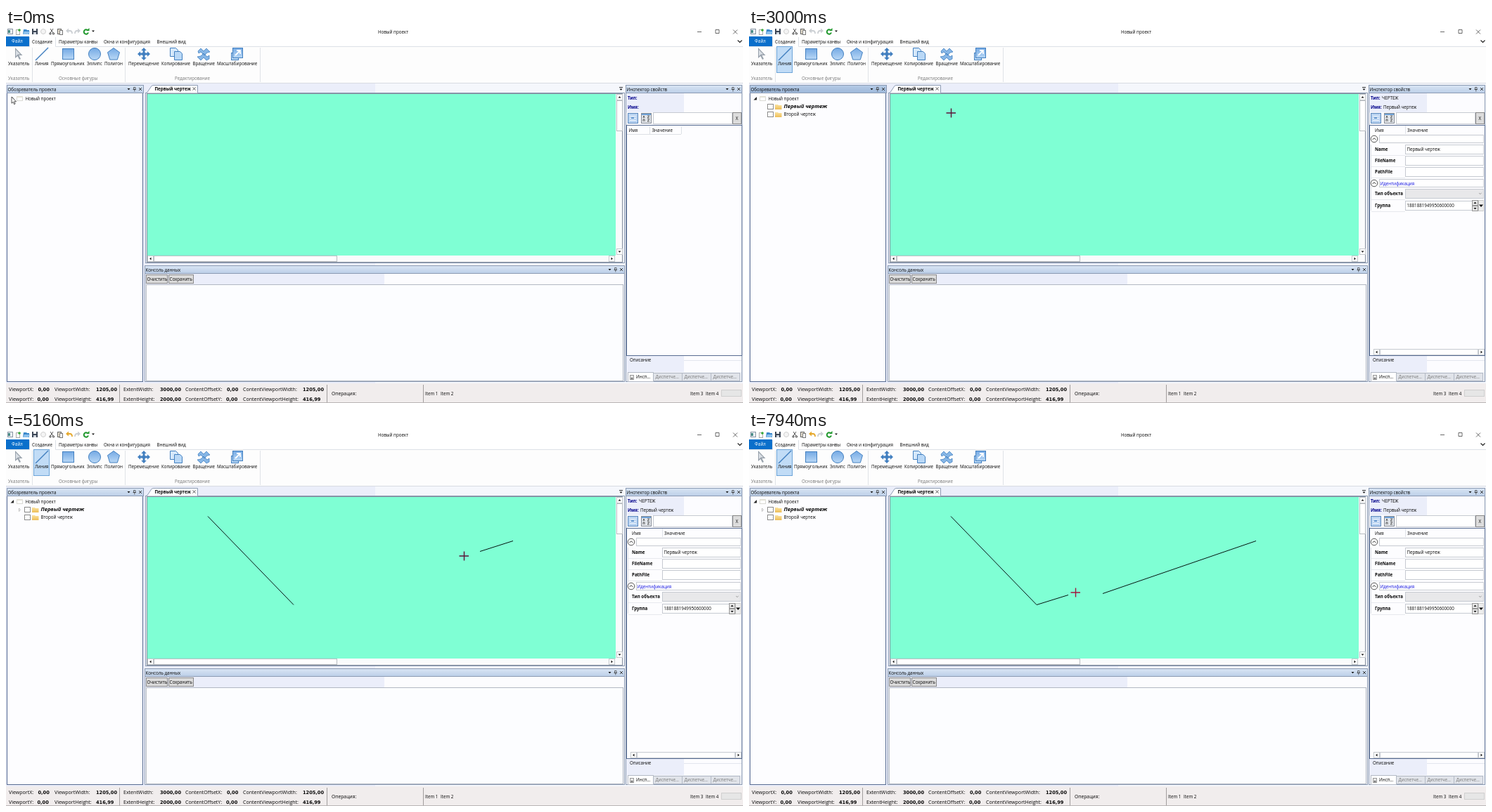
Animation, 1048 px wide and 534 px high, one loop 8000 ms. Source, as an HTML page:

```html
<!DOCTYPE html>
<html lang="ru">
<head>
<meta charset="utf-8">
<title>Новый проект</title>
<style>
html, body { margin: 0; width: 100%; height: 100%; overflow: hidden; background: #fff }
svg { display: block; width: 100%; height: 100% }
text { font: 6.2px "Open Sans", "Noto Sans", sans-serif; fill: #080808; white-space: pre }
.b { font-weight: 700 }
.bi { font-weight: 700; font-style: italic; font-size: 7.5px }
.navy { fill: #00008b; font-weight: 700 }
.blue { fill: #1414e0 }
.gray { fill: #777 }
.white { fill: #fff }
.st { font-size: 7.05px }
.num { font: 700 6.6px "DejaVu Sans", sans-serif }
.op { font-size: 6.75px }
</style>
</head>
<body>
<svg id="stage" viewBox="0 0 1048 534">
  <defs>
    <linearGradient id="head" x2="0" y2="1"><stop stop-color="#d9e5f4"/><stop offset="1" stop-color="#bccfe8"/></linearGradient>
    <linearGradient id="active" x2="0" y2="1"><stop stop-color="#b6cbe6"/><stop offset="1" stop-color="#9db8da"/></linearGradient>
    <linearGradient id="shape" x2="0" y2="1"><stop stop-color="#74a9e4"/><stop offset="1" stop-color="#b9d8f6"/></linearGradient>
    <linearGradient id="folder" x2="0" y2="1"><stop stop-color="#fbe3a0"/><stop offset="1" stop-color="#edbd57"/></linearGradient>
  </defs>
</svg>
<script>
const stage = document.getElementById('stage');
const BORDER = '#8c9bb3', DEEP = '#586c92', TINT = '#ebeefa', AQUA = '#7fffd4', ICON = '#4380c0', SHAPE = 'url(#shape)';

// Markup helpers; text is placed by its left edge and middle line.
const text = (x, y, s, cls = '') => `<text x="${x}" y="${y + 2.2}" class="${cls}">${s}</text>`;
const fill = (x, y, w, h, color) => `<rect x="${x}" y="${y}" width="${w}" height="${h}" fill="${color}"/>`;
const box = (x, y, w, h, color = '#fdfdff', line = BORDER) =>
  `<rect x="${x + .5}" y="${y + .5}" width="${w - 1}" height="${h - 1}" fill="${color}" stroke="${line}"/>`;
const path = (d, line = '#333', width = 1, color = 'none') =>
  `<path d="${d}" stroke="${line}" stroke-width="${width}" fill="${color}"/>`;
const solid = (d, color) => path(d, 'none', 0, color);
const circle = (x, y, r, color, line) => `<circle cx="${x}" cy="${y}" r="${r}" fill="${color}" stroke="${line}"/>`;
const tri = (x, y, turn = 0, s = 2, color = '#111') =>
  `<path d="M${-s} ${-s / 2}H${s}L0 ${s * .65}z" fill="${color}" transform="translate(${x} ${y}) rotate(${turn})"/>`;
const cross = (x, y, s = 2) => path(`M${x - s} ${y - s}l${2 * s} ${2 * s}m0 ${-2 * s}l${-2 * s} ${2 * s}`, '#333', .9);
const group = (id, body) => `<g id="${id}">${body}</g>`;

function header(x, y, w, title) {
  const r = x + w;
  return box(x, y, w, 12, 'url(#head)') + text(x + 1.5, y + 6.3, title) + tri(r - 21.5, y + 6) +
    path(`M${r - 14.5} ${y + 3.5}h2.500v3h-2.500zm-1 3h4.500m-2.200 0v3`, '#333', .7) + cross(r - 5, y + 6);
}
const scrollButton = (x, y, turn) => box(x, y, 9, 9, '#fff', '#c4c8cc') + tri(x + 4.5, y + 4.5, turn);

function titleBar() {
  return fill(0, 0, 1048, 26, '#fff') + text(529, 5.5, 'Новый проект') +
    box(2, 1, 8, 8, '#eef3f8', '#8895a3') + fill(3, 3, 3, 4, '#4b8d87') +
    box(14, 2, 6, 8, '#fff', '#aaa') + circle(19, 3, 1.8, '#36a936', 'none') +
    solid('M25 2h4l1 1h3v6h-9z', '#3c89cc') + solid('M26 5h8l-2 4h-8z', '#8dc1ec') +
    fill(37, 1, 8, 8, '#3d4756') + fill(39, 1, 4, 3, '#fff') + fill(39, 6, 4, 3, '#cdd3db') +
    circle(53, 5, 3.5, '#f4f4f4', '#d0d0d0') +
    path('M63 1l4 6m0-6l-4 6', '#555') + circle(63, 8, 1.2, 'none', '#444') + circle(67.5, 8, 1.2, 'none', '#444') +
    box(73, 1, 6, 8, '#e6dfd0', '#666') + box(76, 3, 5, 7, '#fff', '#777') +
    `<g id="undo">${path('M88 4h3q3 0 3 4', 'currentColor', 1.8)}${solid('M85 4l4-3.5v7z', 'currentColor')}</g>` +
    path('M103 4h-2q-3 0-3 4', '#ccd0d4', 1.8) + solid('M106 4l-4-3.5v7z', '#ccd0d4') +
    path('M116.5 3.5a3.2 3.2 0 1 0 .5 3', '#22992e', 2) + solid('M114 4h4.5V0z', '#22992e') + tri(124, 4.5) +
    path('M983 5.5h6m20-3h5v5h-5zM1034 2.5l6 6m0-6l-6 6', '#444', .8) +
    fill(0, 12, 33, 14, '#0a6fcb') + text(8, 19, 'Файл', 'white') +
    path('M0 26.5H33.5V13M70.5 13V26.5H1048', '#dde1e6') + text(37, 19.3, 'Создание') +
    text(75, 19.3, 'Параметры канвы') + text(139, 19.3, 'Окна и конфигурация') +
    text(214.5, 19.3, 'Внешний вид') + path('M1040.5 17.5l3 3 3-3', '#222', 1.2);
}

function ribbon() {
  const moveArrow = [0, 90, 180, 270].map(a =>
    `<path d="M-1.5 -2v-3h-2.3L0 -9l3.8 4h-2.3v3z" fill="${ICON}" transform="translate(196 37) rotate(${a})"/>`).join('');
  const labels = [[3, 'Указатель'], [41, 'Линия'], [64, 'Прямоугольник'], [115, 'Эллипс'], [140, 'Полигон'],
    [174, 'Перемещение'], [221, 'Копирование'], [265.5, 'Вращение'], [300, 'Масштабирование']];
  return fill(0, 27, 1048, 51, '#fdfdfd') + group('button', box(39, 26, 23, 38, 'currentColor', '#6ea5d8')) +
    path('M37.5 28V77M169.5 28V77M361.5 28V77', '#e0e3e7') + path('M0 78.5H1048', '#d8dce3') +
    solid('M13 28v15l3.5-3 2.5 5 2-1-2.5-5h5z', '#9aa3ad') + solid('M14 31v9l3-2.5 3.5 0z', '#d9dee4') +
    path('M42 46L60 28', ICON, 1.4) + box(80, 29, 17, 16, SHAPE, ICON) + circle(126, 37, 8.5, SHAPE, ICON) +
    path('M153 28.5l8.5 6.2-3.2 10.3h-10.6l-3.2-10.3z', ICON, 1, SHAPE) +
    moveArrow + fill(194, 35, 4, 4, ICON) +
    path('M233.5 28.5h8l3 3v9h-11z', ICON, 1, '#d5e8fb') + path('M239.5 33.5h8l3 3v9h-11z', ICON, 1, '#b9d8f6') +
    path('M273 33l4-4 4 4 4-4 5 5-4 1-4 4-5-5-3 2zM272 41l5-1 4-4 5 5 3-2v5l-4 2-4-4-4 4z', ICON, .8, '#86b6e6') +
    box(320, 35, 11, 11, '#b9d8f6', ICON) + box(322, 28, 15, 15, SHAPE, ICON) +
    path('M326 39l6-6m-4-1h5v5', '#fff', 1.8) +
    labels.map(([x, s]) => text(x, 51, s)).join('') +
    text(3, 72, 'Указатель', 'gray') + text(75, 72, 'Основные фигуры', 'gray') + text(240, 72, 'Редактирование', 'gray');
}

function treePanel() {
  const child = (y, label) => box(26, y - 4, 9, 8, '#fff', '#8a8a8a') +
    solid(`M37 ${y - 3}h4l1 1h4.500v6h-9.500z`, 'url(#folder)') + label;
  return box(1, 92, 194, 412, '#fdfdff', DEEP) + group('treeHead', header(1, 81, 195, 'Обозреватель проекта')) +
    box(15, 97, 9, 7, '#fff', '#d9d9d4') + fill(15, 97, 9, 2, '#e3e1d6') + text(27.5, 100.5, 'Новый проект') +
    group('closed', path('M8.5 98v5l2.5-2.5z', '#999', .7, '#fff')) +
    group('open', solid('M11 98v4.5H6.5z', '#222') +
      group('mark', box(49, 107, 54, 10.5, '#cfeafd', '#a5d6f6')) +
      child(112, group('plain', text(49.5, 112, 'Первый чертеж')) + group('bold', text(49.5, 112, 'Первый чертеж', 'b')) +
        group('italic', text(49.5, 112, 'Первый чертеж', 'bi'))) +
      child(123, text(49.5, 122.8, 'Второй чертеж')) +
      group('expander', path('M18.5 110v4.5l2.2-2.2z', '#aaa', .7, '#fff')));
}

function drawingPanel() {
  return box(198, 92, 682, 243, '#f5f7fb') + path('M199 92.5l2-1 6-9q1-1 3-1h62.5v11', BORDER, 1, '#fff') +
    text(211.5, 86.6, 'Первый чертеж', 'b') + cross(267.5, 86.5) +
    path('M872 84.5h5', '#333') + tri(874.5, 87.5) + box(200, 93, 677, 241, '#fafbfc', '#858f9e') +
    fill(201, 94, 666, 230, AQUA) +
    scrollButton(868, 94, 180) + box(868, 103, 9, 44, '#fff', '#b8bcc1') + scrollButton(868, 314, 0) +
    scrollButton(201, 324, 90) + box(210, 324, 261, 9, '#fff', '#b8bcc1') + scrollButton(857, 324, -90);
}

function consolePanel() {
  const button = (x, w, s) => box(x, 351, w, 13, '#dcdcdc', '#8a8a8a') + text(x + 1.5, 357.8, s);
  return box(197, 338, 683, 166, '#fcfcfe') + header(197, 338, 683, 'Консоль данных') +
    fill(198, 350, 340, 15, TINT) + button(199, 31, 'Очистить') + button(231, 36, 'Сохранить') +
    box(199, 365, 679, 138, '#fcfdff', '#b2b8c2');
}

function inspector() {
  const line = '#c6cad1';
  const row = (y, name, value = '', right = 1045, color = '#fff') =>
    text(890, y, name, 'b') + box(933, y - 7, right - 933, 14, color, line) + text(935.5, y, value) +
    path(`M885 ${y + 8}.5H933`, '#e7e9ee');
  const section = (y, s) => circle(889, y, 4.8, '#fff', '#555') + path(`M886.5 ${y + 1.2}l2.5-2.5 2.5 2.5`, '#333') +
    box(896, y - 6, 149, 12, '#fff', line) + text(897.5, y + .3, s, 'blue');
  const tab = (x, w, s, on) => box(x, on ? 490 : 491, w, on ? 14 : 12, on ? '#fff' : '#e1e4ea', '#b4bac6') +
    text(x + (on ? 12 : 3.5), 497, s, on ? '' : 'gray');
  return box(881, 81, 166, 423, '#fcfcff') + header(881, 81, 166, 'Инспектор свойств') +
    fill(882, 93, 82, 27, TINT) + text(884, 99.5, 'Тип:', 'navy') + text(884, 112.8, 'Имя:', 'navy') +
    box(884, 121, 15, 15, '#b9d3f1', '#5c89bd') + path('M887 125.5h9m-9 3h9m-9 3h9', '#f4f8fd') + fill(889, 127, 4, 2, '#6f9dd0') +
    box(903, 121, 15, 15, '#e1e4e9', '#878d96') + fill(904, 122, 13, 2, '#6da0d6') +
    path('M906 128l1-3 1 3m-2 5v-3h2v3m4-8h3l-3 3h3m-3 2h3l-3 3h3', '#444', .8) +
    box(920, 120, 113, 17, '#fff', line) + box(1033, 120, 13, 17, '#dcdcdc', '#888') + text(1037.5, 128.5, 'X') +
    box(882, 138, 165, 329, '#fdfdff', DEEP) +
    group('empty', text(885.5, 145.5, 'Имя') + text(918.5, 145.5, 'Значение') + path('M915.5 140V151M960.5 140V151M883 151.5H960', '#dde0e5')) +
    group('props', text(900, 99.5, 'ЧЕРТЕЖ') + text(902, 112.8, 'Первый чертеж') +
      text(890, 145.5, 'Имя') + text(936, 145.5, 'Значение') + path('M933.5 139V151M884.5 166V260', '#dfe2e8') +
      section(158, '') + row(173, 'Name', 'Первый чертеж') + row(189, 'FileName') + row(205, 'PathFile') +
      section(221, 'Идентификация') + row(236, 'Тип объекта', '', 1045, '#e8e8ea') +
      path('M1038 235l1.8 1.5 1.8-1.5', '#888', .8) + row(253, 'Группа', '1881881949950600000', 1029) +
      box(1028, 245, 9, 8, '#e4e4e4', '#999') + box(1028, 253, 9, 8, '#e4e4e4', '#999') +
      tri(1032.5, 249, 180) + tri(1032.5, 257) + box(1037, 245, 8, 16, '#eee', '#ccc') + tri(1041, 253, 0, 3) +
      scrollButton(888, 457, 90) + box(897, 457, 140, 9, '#fff', line) + scrollButton(1037, 457, -90)) +
    fill(882, 467, 82, 23, TINT) + path('M964 473.5H1046', '#e3e6ee') + text(887, 473, 'Описание') +
    fill(882, 490, 164, 13, '#eef1f6') +
    tab(884, 37, 'Инсп...', true) + tab(920, 42, 'Диспетче...') + tab(961, 42, 'Диспетче...') + tab(1002, 42, 'Диспетче...') +
    box(887, 494, 6, 7, '#e9e9e9', '#999') + circle(890, 499, 1.5, '#777', 'none');
}

function statusBar() {
  const pair = (x, valueX, name, value, y) => text(x, y, name + ':', 'st') + text(valueX, y, value, 'num');
  const line = (y, axis, size, view, extent, vx, ex) =>
    pair(4, vx, 'Viewport' + axis, '0,00', y) + pair(69, 128, 'Viewport' + size, view, y) +
    pair(167, 219, 'Extent' + size, extent, y) + pair(255, ex, 'ContentOffset' + axis, '0,00', y) +
    pair(337, 422, 'ContentViewport' + size, view, y);
  return fill(0, 506, 1048, 28, '#f1eded') + path('M0 533.5H1048', '#b9b5b5') +
    line(515, 'X', 'Width', '1205,00', '3000,00', 45.5, 314) + line(528.5, 'Y', 'Height', '416,99', '2000,00', 44.5, 313) +
    path('M161.5 508V533M456.5 508V533M593.5 508V533', '#a29f9f') + text(463, 520.5, 'Операция:', 'op') +
    text(596, 520.5, 'Item 1') + text(618, 520.5, 'Item 2') + text(973, 520.5, 'Item 3') + text(995, 520.5, 'Item 4') +
    box(1017, 515, 29, 10, '#e6e6e6', '#cfcfcf');
}

stage.innerHTML += fill(0, 78, 525, 428, TINT) + fill(525, 78, 523, 428, '#f5f7fc') +
  titleBar() + ribbon() + treePanel() + drawingPanel() + consolePanel() + inspector() + statusBar() +
  ['line1', 'line2', 'line3'].map(id => `<path id="${id}" stroke="#04140f"/>`).join('') +
  group('arrow', path('M0 0v9.2l2.1-1.9 1.5 3.4 1.5-.7-1.5-3.2h2.9z', '#222', .75, '#fff')) +
  group('plus', path('M-6.5 0H7M.5 -6.5V6.5', 'currentColor', 1.4));

// Pointer moves: start, end, steps, target x, target y.
const moves = [
  [60, 160, 2, 9, 99], [710, 1150, 7, 57, 114], [1740, 2130, 7, 50, 39],
  [2360, 2830, 7, 294, 128], [2910, 3000, 2, 287, 121], [3150, 3480, 5, 494, 201],
  [3750, 4200, 6, 409, 247], [4470, 4860, 7, 721, 157], [5010, 5160, 3, 651, 178], [5240, 5480, 4, 503, 231],
  [6040, 6310, 5, 588, 274], [6540, 7150, 9, 403, 241], [7260, 7260, 1, 406, 245], [7530, 7940, 6, 464, 230]
];
const LAG = 70; // a drawn line trails the pointer by one step

function stepped(t, start, end, n) {
  if (t < start) return 0;
  const k = Math.floor((t - start) / (end - start || 1) * (n - 1) + 1e-6) + 1;
  return Math.min(1, k / n);
}

function pointer(t) {
  let x = 8, y = 98;
  for (const [start, end, n, tx, ty] of moves) {
    const k = stepped(t, start, end, n);
    x += (tx - x) * k;
    y += (ty - y) * k;
  }
  return [Math.round(x), Math.round(y)];
}

const el = id => document.getElementById(id);
const show = (id, on) => el(id).style.display = on ? '' : 'none';
function drawLine(id, t, start, stop, x, y) {
  const [ex, ey] = pointer(Math.min(t - LAG, stop));
  show(id, t >= start + LAG);
  el(id).setAttribute('d', `M${x} ${y}L${ex} ${ey + .5}`);
}

function frame(now) {
  const t = now % 8000, [x, y] = pointer(t);
  const selected = t >= 1220, renamed = t >= 1490;
  el('treeHead').firstChild.setAttribute('fill', t >= 370 && t < 3750 ? 'url(#active)' : 'url(#head)');
  show('closed', t < 370);
  show('open', t >= 370);
  show('mark', selected && t < 2280);
  el('mark').firstChild.setAttribute('width', renamed ? 63 : 53);
  show('plain', !selected);
  show('bold', selected && !renamed);
  show('italic', renamed);
  show('expander', t >= 3660);
  show('empty', !selected);
  show('props', selected);
  show('button', t >= 2000);
  el('button').style.color = t < 2280 ? '#e3f0fc' : '#c1dcf6';
  el('undo').style.color = t < 3750 ? '#ccd0d4' : '#e6a92d';

  drawLine('line1', t, 3150, 4300, 287, 121.5);
  drawLine('line2', t, 5010, 5600, 721, 156.5);
  drawLine('line3', t, 7530, 8000, 409, 247.5);

  const drawing = x > 200 && (t < 5760 || t >= 7530);
  const dark = t < 3150 || (t >= 4470 && t < 5760);
  show('arrow', !drawing);
  show('plus', drawing);
  el('plus').style.color = dark ? '#5c1236' : '#a3143f';
  for (const id of ['arrow', 'plus']) el(id).setAttribute('transform', `translate(${x} ${y})`);
  requestAnimationFrame(frame);
}
requestAnimationFrame(frame);
</script>
</body>
</html>
```
